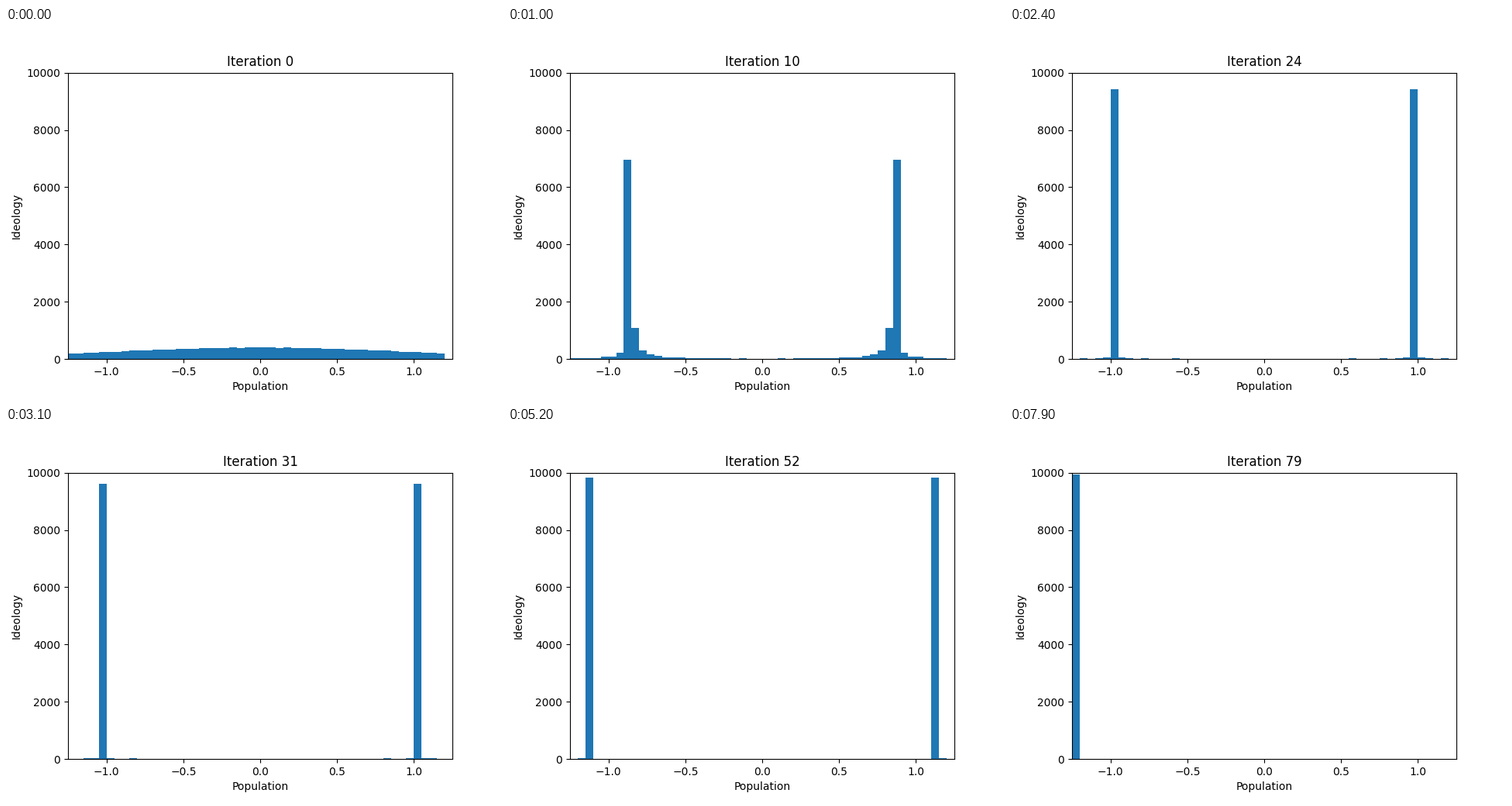
Animation, 640 px wide and 480 px high, one loop 8 s. Source, as a matplotlib script:

```python
import numpy as np
import matplotlib.pyplot as plt
from matplotlib.animation import FuncAnimation

STEPS = 80
BIN = 0.05
HALF = 25        # bins on each side of zero
AGENTS = 368     # agents on each side of zero
WEIGHT = 27.2    # people per agent
GATHER = 10      # steps until the clusters have formed


def centre(t):
    """The cluster drifts outward and slows down."""
    return np.interp(t, [0, 41, 65, 79], [0.795, 1.109, 1.189, 1.22])


def normal_half(n):
    """Evenly spaced quantiles of the positive half of a normal curve."""
    x = np.linspace(0, 4, 4001)
    mass = np.cumsum(np.exp(-x**2 / 2))
    return np.interp((np.arange(n) + 0.5) / n, mass / mass[-1], x)


def ease(s):
    return (1 - np.exp(-4 * s)) / (1 - np.exp(-4))


RANK = np.arange(1, AGENTS + 1)
BEGIN = normal_half(AGENTS) - centre(0)


def settled(t):
    """Offsets from the centre: moderates lag behind, extremists stay out."""
    lag = 14 * np.exp((GATHER - t) / 14)
    inner = centre(t) * (1 + RANK / lag) ** (-0.2 * t)
    far = 2 + 19 * np.exp((GATHER - t) / 25)
    outer = 0.33 * (far / (AGENTS - RANK + 0.5)) ** (0.4 * t)
    return np.minimum(outer, 2) - inner


def heights(t):
    e = ease(min(t / GATHER, 1))
    x = centre(t) + (1 - e) * BEGIN + e * settled(max(t, GATHER))
    side = np.histogram(x, bins=np.arange(HALF + 1) * BIN)[0] * WEIGHT
    # the outermost bin exists on the left only
    return np.concatenate([side[::-1], side[:-1]])


fig, ax = plt.subplots(figsize=(6.4, 4.8), dpi=100)
edges = (np.arange(2 * HALF - 1) - HALF) * BIN
bars = ax.bar(edges, heights(0), width=BIN, align="edge", color="#1f77b4")
ax.set_xlim(-1.25, 1.25)
ax.set_ylim(0, 10000)
ax.set_xlabel("Population")
ax.set_ylabel("Ideology")
title = ax.set_title("Iteration 0")


def update(step):
    for bar, h in zip(bars, heights(step)):
        bar.set_height(h)
    title.set_text(f"Iteration {step}")
    return [*bars, title]


anim = FuncAnimation(fig, update, frames=STEPS, interval=100,
                     repeat=True, repeat_delay=0, blit=False)
plt.show()
```
